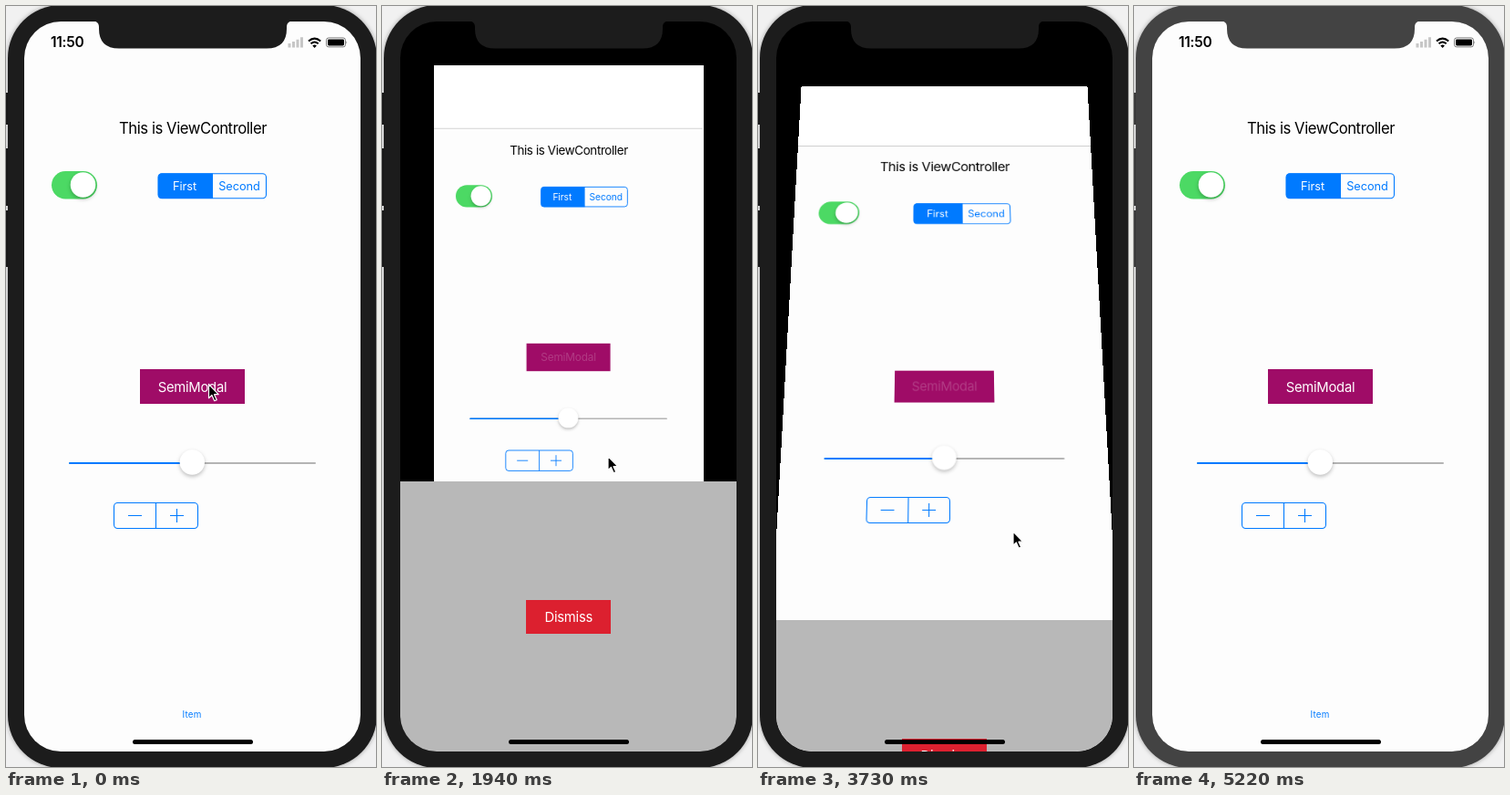
An HTML page that plays this animation: 406 px wide and 834 px high, repeating every 5320 ms.

```html
<!DOCTYPE html>
<html lang="en">
<head>
<meta charset="utf-8">
<title>Semi modal</title>
<style>
  html, body { margin: 0; width: 100%; height: 100%; overflow: hidden; background: #f1f1f1; }
  #stage { position: relative; width: 406px; height: 834px; overflow: hidden; --bezel: #1c1c1c; }
  #stage.inactive { --bezel: #434343; }
  .key { position: absolute; left: 0; width: 3px; background: var(--bezel); }
  #shell {
    position: absolute; left: 2px; top: -1px; width: 405px; height: 836px;
    border-radius: 58px; background: var(--bezel); box-shadow: 0 0 5px rgba(0, 0, 0, .35);
  }
  #screen {
    position: absolute; left: 20px; top: 17px; width: 369px; height: 800px;
    border-radius: 40px; overflow: hidden; background: #000;
  }
  #screen > * { position: absolute; left: 0; top: 0; }
  #card { width: 369px; height: 800px; background: #fdfdfd; }
  #sheet { width: 369px; height: 296px; background: #b8b8b8; }
  svg { display: block; overflow: hidden; }
  #cursor { position: absolute; left: 0; top: 0; overflow: visible; }
  text { font-family: Inter, "Liberation Sans", sans-serif; text-anchor: middle; }
  .title { font-size: 16.7px; letter-spacing: -.45px; }
  .button { font-size: 14.8px; letter-spacing: -.24px; fill: #fff; }
  .segment { font-size: 12.8px; letter-spacing: -.08px; }
  .item { font-size: 9.8px; letter-spacing: .2px; }
  .clock { font-size: 15.5px; font-weight: 600; letter-spacing: -.3px; }
  .tint { fill: #007aff; }
  .outline { fill: none; stroke: #007aff; stroke-width: 1.1; }
  .knob { fill: #fff; filter: drop-shadow(0 2px 2px rgba(0, 0, 0, .25)); }
</style>
</head>
<body>
<div id="stage">
  <div class="key" style="top:95px;height:35px"></div>
  <div class="key" style="top:156px;height:63px"></div>
  <div class="key" style="top:224px;height:62px"></div>
  <div id="shell"></div>

  <div id="screen">
    <div id="card">
      <svg width="369" height="800" viewBox="20 17 369 800">
        <g id="navbar">
          <rect x="20" y="17" width="369" height="86.5" fill="#fff"/>
          <rect x="20" y="103" width="369" height="1" fill="#cbcbcb"/>
        </g>
        <text class="title" x="205" y="139.5">This is ViewController</text>

        <rect x="50" y="181" width="50" height="30.5" rx="15.2" fill="#4cd964"/>
        <circle class="knob" cx="84.5" cy="196" r="13.8"/>

        <path class="tint" d="M227 183.5H171a4 4 0 0 0-4 4V207a4 4 0 0 0 4 4H227Z"/>
        <rect class="outline" x="167" y="183.7" width="118.5" height="27" rx="4"/>
        <text class="segment" x="196" y="202" fill="#fff">First</text>
        <text class="segment tint" x="256" y="202">Second</text>

        <rect x="147" y="398" width="115" height="38" fill="#9f0c67"/>
        <text id="open" class="button" x="204.5" y="422.5">SemiModal</text>

        <rect x="69" y="500" width="271" height="2" rx="1" fill="#b4b4b4"/>
        <rect class="tint" x="69" y="500" width="136" height="2" rx="1"/>
        <circle class="knob" cx="204.3" cy="500" r="13.7"/>

        <rect class="outline" x="118.5" y="544.5" width="92" height="28" rx="4"/>
        <path class="outline" d="M164.5 544.5v28M134 558.5h15M180 558.5h15M187.5 551v15"/>

        <text class="item tint" x="204" y="780">Item</text>
      </svg>
    </div>

    <div id="sheet">
      <svg width="369" height="296" viewBox="20 0 369 296">
        <rect x="158" y="130" width="93" height="37" fill="#dc202f"/>
        <text id="dismiss" class="button" x="204.8" y="154">Dismiss</text>
      </svg>
    </div>

    <svg width="369" height="800" viewBox="20 17 369 800">
      <text class="clock" x="67.2" y="45.3">11:50</text>
      <path d="M311 41v4.5M315.5 39v6.5M320 36.8v8.7M324.5 34.3v11.2" stroke="#000" stroke-opacity=".22" stroke-width="3"/>
      <path d="M332 38.6q6.6-6 13.2 0M334.5 41.3q4.1-3.6 8.2 0" fill="none" stroke="#000" stroke-width="2"/>
      <path d="M338.6 46l-2.3-2.5q2.3-1.9 4.6 0Z"/>
      <rect x="351.5" y="34.9" width="21" height="10" rx="2.6" fill="none" stroke="#000" stroke-opacity=".5"/>
      <rect x="353" y="36.4" width="18" height="7" rx="1.4"/>
      <path d="M373.4 38.2q1.6 1.7 0 3.4Z" fill-opacity=".5"/>
      <path d="M96 16.5q6 .5 6 6.5v2q0 21.500 22 21.500H286q22 0 22-21.500v-2q0-6 6-6.500Z" style="fill:var(--bezel)"/>
      <rect x="139" y="804" width="132" height="5" rx="2.5"/>
    </svg>
  </div>

  <svg id="cursor" width="12" height="20">
    <path d="M0 0V15.200L3.400 12 6.200 18.200 8.700 17.100 6 11.200H10.700Z" stroke="#fff" stroke-width="1.2" stroke-linejoin="round"/>
  </svg>
</div>

<script>
const LOOP = 5320, DURATION = 500;

// The screen refreshes only at these moments.
const refreshes = [
  0, 900, 1200, 1350, 1490, 1640, 1790, 1940, 2090, 2240, 2380, 2530, 2680, 2830, 2980,
  3280, 3430, 3580, 3730, 3880, 4030, 4180, 4330, 4470, 4620, 4770, 4920, 5070, 5220
];

const transitions = [
  { start: 1113, lag: 0, opens: true },
  { start: 2367, lag: 20, opens: false },
  { start: 3484, lag: 0, opens: true },
  { start: 4454, lag: 0, opens: false }
];

// time, x, y of the pointer tip
const pointerPath = [
  [0, 222.5, 414.5], [1640, 222.5, 414.5], [1790, 229, 442], [1940, 248, 493.5],
  [2090, 286, 488], [2240, 309, 469], [2980, 309, 469], [3280, 256, 436], [3430, 228, 418],
  [3580, 236, 446], [3730, 280, 576], [3880, 262, 640], [4030, 232, 668], [4180, 218, 672],
  [4330, 218, 672], [4470, 262, 712], [4620, 334, 767.5], [4770, 392, 826], [4920, 430, 860]
];

const byId = id => document.getElementById(id);
const [stage, card, sheet, navbar, openLabel, dismissLabel, cursor] =
  ["stage", "card", "sheet", "navbar", "open", "dismiss", "cursor"].map(byId);

const clamp = v => Math.min(1, Math.max(0, v));

function bezier(x1, x2) {
  const x = u => 3 * u * (1 - u) ** 2 * x1 + 3 * u * u * (1 - u) * x2 + u ** 3;
  return value => {
    let low = 0, high = 1;
    for (let i = 0; i < 24; i++) {
      const mid = (low + high) / 2;
      if (x(mid) < value) low = mid; else high = mid;
    }
    return low * low * (3 - 2 * low);
  };
}
const easeInOut = bezier(.42, .58);
const easeOut = bezier(0, .58);

// 0 = flat, 1 = tilted back, 2 = pushed back
function cardStage(progress) {
  if (progress <= 0) return 0;
  if (progress >= 1) return 2;
  return progress < .5 ? easeOut(progress * 2) : 1 + easeOut(progress * 2 - 1);
}

function cardTransform(position) {
  if (position === 0) return "none";
  const tilt = Math.min(position, 1), push = Math.max(position - 1, 0);
  return `perspective(${886 / Math.max(tilt, .001)}px) translateY(${-32 * push}px) ` +
    `scale(${1 - .05 * tilt - .15 * push}) rotateX(${15 * (tilt - push)}deg)`;
}

function pointerAt(t) {
  const next = pointerPath.findIndex(point => point[0] > t);
  if (next < 0) return pointerPath[pointerPath.length - 1].slice(1);
  const [t0, x0, y0] = pointerPath[next - 1], [t1, x1, y1] = pointerPath[next];
  const k = (t - t0) / (t1 - t0);
  return [x0 + (x1 - x0) * k, y0 + (y1 - y0) * k];
}

function render(t) {
  const current = transitions.filter(item => item.start <= t).pop();
  let shown = 0, position = 0;
  if (current) {
    const elapsed = t - current.start;
    const moved = clamp(elapsed / DURATION);
    const eased = moved < 1 ? easeInOut(moved) : 1;
    const turned = cardStage(clamp((elapsed - current.lag) / DURATION));
    shown = current.opens ? eased : 1 - eased;
    position = current.opens ? turned : 2 - turned;
  }
  card.style.transform = cardTransform(position);
  sheet.style.transform = `translateY(${Math.round(800 - 296 * shown)}px)`;
  navbar.style.display = position > 0 && t < 4400 ? "" : "none";

  const pressed = (t >= 900 && t < 2900) || (t >= 3430 && t < 5000);
  openLabel.style.fillOpacity = pressed ? .2 : 1;
  dismissLabel.style.fillOpacity = t < 4330 ? 1 : clamp(.2 + (t - 4400) / 400);

  const [x, y] = pointerAt(t);
  cursor.style.transform = `translate(${x}px, ${y}px)`;
  stage.classList.toggle("inactive", t >= 5220);
}

function tick() {
  const now = performance.now() % LOOP;
  render(refreshes.filter(time => time <= now).pop());
  requestAnimationFrame(tick);
}
tick();
</script>
</body>
</html>
```
